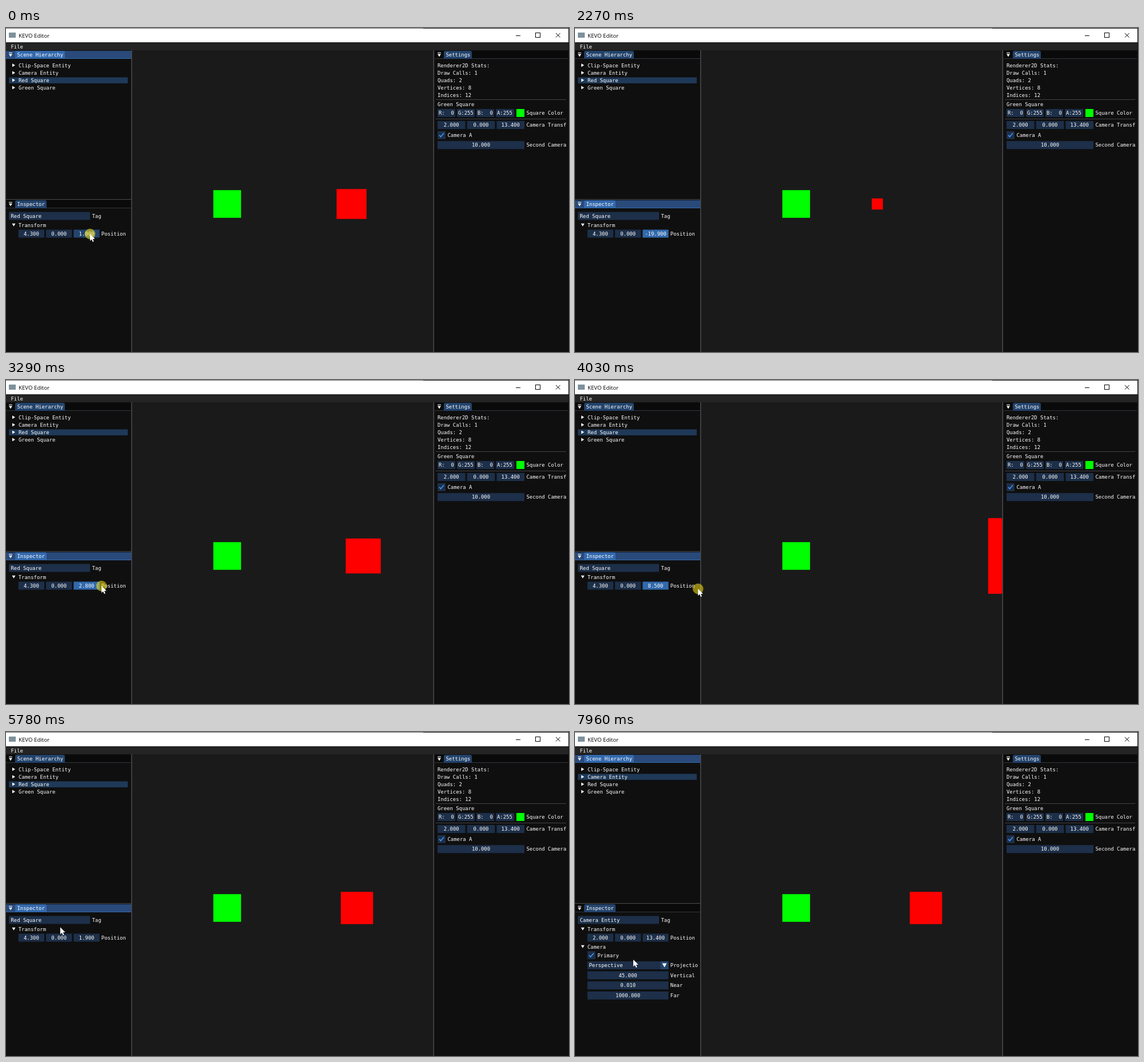
An HTML page with a canvas for the animation above (8000 ms loop, 985 px wide and 568 px high).

```html
<!DOCTYPE html>
<html lang="en">
<head>
<meta charset="utf-8">
<title>KEVO Editor</title>
<style>
html, body { margin: 0; width: 100%; height: 100%; overflow: hidden; background: #0f0f0f; }
canvas { display: block; }
</style>
</head>
<body>
<canvas id="stage" width="985" height="568"></canvas>
<script>
const ctx = document.getElementById('stage').getContext('2d');
const LOOP = 8000;
const FRAME = '#1d2f49', HOVER = '#23456d', ACTIVE = '#3169ac', CHECK = '#4296fa', LINE = '#43434b';
const PRESS = 40, RELEASE = 5360, SELECT = 6880, CLICK_END = 7010;

// Rows of [time, value, ...], joined linearly
const depthKeys = [
  [150, 1], [970, -2.4], [1200, -5.4], [1810, -16], [1910, -19.9], [2270, -19.9], [3060, -1.7],
  [3290, 2.8], [3750, 8.4], [3980, 8.4], [4100, 8.7], [4580, 4.1], [4760, 2.7], [4940, 1.9]
];
const cursorKeys = [
  [150, 147, 361], [970, 112, 355], [1200, 91, 350], [1810, -2, 352], [1910, -36, 354],
  [2270, -36, 355], [3060, 136, 359], [3290, 167, 361], [3750, 214, 366], [3980, 214, 366],
  [4100, 217, 366], [4580, 166, 360], [4940, 147, 357], [5320, 147, 357], [5780, 95, 343],
  [6170, 75, 76], [6350, 70, 66], [6530, 70, 77], [7000, 70, 77], [7680, 105, 256], [7960, 102, 399]
];

function track(keys, t) {
  const i = keys.findIndex(key => key[0] > t);
  if (i === 0) return keys[0].slice(1);
  if (i < 0) return keys[keys.length - 1].slice(1);
  const a = keys[i - 1], b = keys[i], p = (t - a[0]) / (b[0] - a[0]);
  return a.slice(1).map((v, k) => v + (b[k + 1] - v) * p);
}

function box(x, y, w, h, color) {
  ctx.fillStyle = color;
  ctx.fillRect(x, y, w, h);
}

function poly(color, ...points) {
  ctx.fillStyle = color;
  ctx.beginPath();
  for (let i = 0; i < points.length; i += 2) ctx.lineTo(points[i], points[i + 1]);
  ctx.fill();
}

function stroke(color, width, ...points) {
  ctx.strokeStyle = color;
  ctx.lineWidth = width;
  ctx.beginPath();
  for (let i = 0; i < points.length; i += 2) ctx.lineTo(points[i], points[i + 1]);
  ctx.stroke();
}

// y is the middle of the capitals
function text(s, x, y, align = 'left') {
  ctx.font = '8.93px "DejaVu Sans Mono", monospace';
  ctx.textAlign = align;
  ctx.fillStyle = '#fff';
  ctx.fillText(s, x, y + 3.2);
}

function clipped(x, y, w, h, draw) {
  ctx.save();
  ctx.beginPath();
  ctx.rect(x, y, w, h);
  ctx.clip();
  draw();
  ctx.restore();
}

function field(s, x, y, w, color = FRAME) {
  box(x, y - 7, w, 14, color);
  text(s, x + w / 2, y, 'center');
}

function checkbox(x, y, label) {
  box(x, y - 7, 14, 14, FRAME);
  stroke(CHECK, 1.7, x + 3, y, x + 5.5, y + 3, x + 11, y - 3.5);
  text(label, x + 17.5, y);
}

function arrowDown(x, y) {
  poly('#fff', x - 3, y - 2.3, x + 3, y - 2.3, x, y + 2.7);
}

function panelTitle(s, x, y, w, tabWidth, active) {
  box(x, y, w, 14, active ? '#294a7a' : '#0a0a0a');
  box(x, y + 13, w, 1, active ? '#3369ad' : '#33363e');
  ctx.fillStyle = active ? '#3369ad' : '#23436c';
  ctx.beginPath();
  ctx.roundRect(x + 16, y, tabWidth, 14, [3, 3, 0, 0]);
  ctx.fill();
  box(x + 5, y + 3, 6, 1, '#fff');
  arrowDown(x + 8, y + 7.8);
  text(s, x + 19.5, y + 7);
}

function square(x, z, color) {
  const scale = 650 / (13.4 - z);
  box(484 + (x - 2) * scale - scale / 2, 308.5 - scale / 2, scale, scale, color);
}

function windowFrame() {
  box(0, 0, 985, 568, '#0f0f0f');
  box(0, 0, 730, 1, '#6b6b6b');
  box(730, 0, 255, 1, '#111');
  box(0, 1, 984, 24, '#fff');
  box(5, 8, 12, 9, '#7d909c');
  ctx.font = '9.7px "Open Sans", sans-serif';
  ctx.textAlign = 'left';
  ctx.fillStyle = '#000';
  ctx.fillText('KEVO Editor', 22, 16.5);
  stroke('#000', 1, 892, 13.5, 900, 13.5);
  ctx.strokeRect(926.5, 8.5, 8, 8);
  stroke('#000', 1, 962, 9, 969.5, 16.5);
  stroke('#000', 1, 969.5, 9, 962, 16.5);
  box(0, 25, 984, 14, '#242424');
  text('File', 8.5, 32.5);
}

function hierarchy(t, mouse, selected) {
  panelTitle('Scene Hierarchy', 0, 40, 219, 87, t < PRESS || t >= SELECT);
  ['Clip-Space Entity', 'Camera Entity', 'Red Square', 'Green Square'].forEach((name, i) => {
    const y = 65.3 + i * 13.1;
    const hovered = mouse[0] < 213 && Math.abs(mouse[1] - y) < 6.5;
    if (hovered) box(5, y - 5, 208, 10.5, '#387bcb');
    else if (name === selected) box(5, y - 5, 208, 10.5, '#1f3958');
    poly('#fff', 11, y - 3, 16, y, 11, y + 3);
    text(name, 22, y);
  });
}

function inspector(t, mouse, selected, depth) {
  const isCamera = selected === 'Camera Entity';
  const dragging = t >= PRESS && t < RELEASE;
  panelTitle('Inspector', 0, 302, 219, 55, t >= PRESS && t < SELECT);
  box(5, 322.5, 142, 14, FRAME);
  text(selected, 8.5, 329.8);
  text('Tag', 150.5, 329.8);
  arrowDown(13.5, 345);
  text('Transform', 21.7, 345.3);
  const position = isCamera ? [2, 0, 13.4] : [4.3, 0, depth];
  position.forEach((v, i) => {
    const x = 21.7 + i * 48.3;
    const hovered = !isCamera && mouse[0] >= x && mouse[0] < x + 45.3 && Math.abs(mouse[1] - 360.5) < 7;
    const color = dragging ? (i === 2 ? ACTIVE : FRAME) : hovered ? HOVER : FRAME;
    field(v.toFixed(3), x, 360.5, 45.3, color);
  });
  text('Position', 166.8, 360.5);
  if (!isCamera) return;
  arrowDown(13.5, 376);
  text('Camera', 21.7, 376.3);
  checkbox(21.7, 391.3, 'Primary');
  box(21.7, 402, 141.8, 14, FRAME);
  box(149.5, 402, 14, 14, HOVER);
  poly('#fff', 152.5, 405.5, 160.5, 405.5, 156.5, 412.5);
  text('Perspective', 24.5, 409);
  clipped(160, 395, 55.5, 80, () => text('Projection', 166.8, 409));
  [['45.000', 'Vertical'], ['0.010', 'Near'], ['1000.000', 'Far']].forEach(([value, label], i) => {
    const y = 426.5 + i * 17.7;
    field(value, 21.7, y, 141.8);
    text(label, 166.8, y);
  });
}

function settings() {
  panelTitle('Settings', 750, 40, 233, 49, false);
  ['Renderer2D Stats:', 'Draw Calls: 1', 'Quads: 2', 'Vertices: 8', 'Indices: 12']
    .forEach((s, i) => text(s, 755, 65.3 + i * 13.1));
  box(752, 125, 228, 1, LINE);
  text('Green Square', 755, 134);
  ['R:  0', 'G:255', 'B:  0', 'A:255'].forEach((s, i) => {
    box(755 + i * 34, 142, i === 3 ? 32 : 31, 14, FRAME);
    text(s, 757 + i * 34, 149);
  });
  box(893, 142, 14, 14, '#0f0');
  box(752, 159, 228, 1, LINE);
  ['2.000', '0.000', '13.400'].forEach((s, i) => field(s, 755 + i * 51.7, 170, 48.6));
  checkbox(755, 187.8, 'Camera A');
  field('10.000', 755, 205.2, 152);
  clipped(908, 140, 72, 75, () => {
    text('Square Color', 910.5, 149);
    text('Camera Transform', 910.5, 170);
    text('Second Camera', 910.5, 205.2);
  });
}

function viewport(depth) {
  box(220, 39, 528, 529, '#1a1a1a');
  clipped(221, 39, 526.5, 529, () => {
    square(0, 0, '#0f0');
    square(4.3, depth, '#f00');
  });
  box(219, 39, 1.5, 529, '#4a4a52');
  box(747.5, 39, 1.5, 529, '#4a4a52');
  box(0, 300, 219, 1, '#4a4a52');
}

function pointer([x, y], pressed) {
  if (x < 2) return;
  if (pressed) {
    ctx.fillStyle = 'rgba(255, 235, 20, .53)';
    ctx.beginPath();
    ctx.arc(x, y, 9.3, 0, 7);
    ctx.fill();
  }
  poly('#fff', x, y, x, y + 12.2, x + 2.8, y + 9.6, x + 4.8, y + 14, x + 6.7, y + 13.1,
    x + 4.8, y + 8.9, x + 8.6, y + 8.7);
}

function draw(now) {
  const t = now % LOOP;
  const depth = Math.round(track(depthKeys, t)[0] * 10) / 10;
  const mouse = track(cursorKeys, t);
  const selected = t < SELECT ? 'Red Square' : 'Camera Entity';
  windowFrame();
  viewport(depth);
  hierarchy(t, mouse, selected);
  inspector(t, mouse, selected, depth);
  settings();
  pointer(mouse, t < RELEASE || (t >= SELECT && t < CLICK_END));
}

const start = performance.now();
function tick() {
  draw(performance.now() - start);
  requestAnimationFrame(tick);
}
tick();
</script>
</body>
</html>
```
